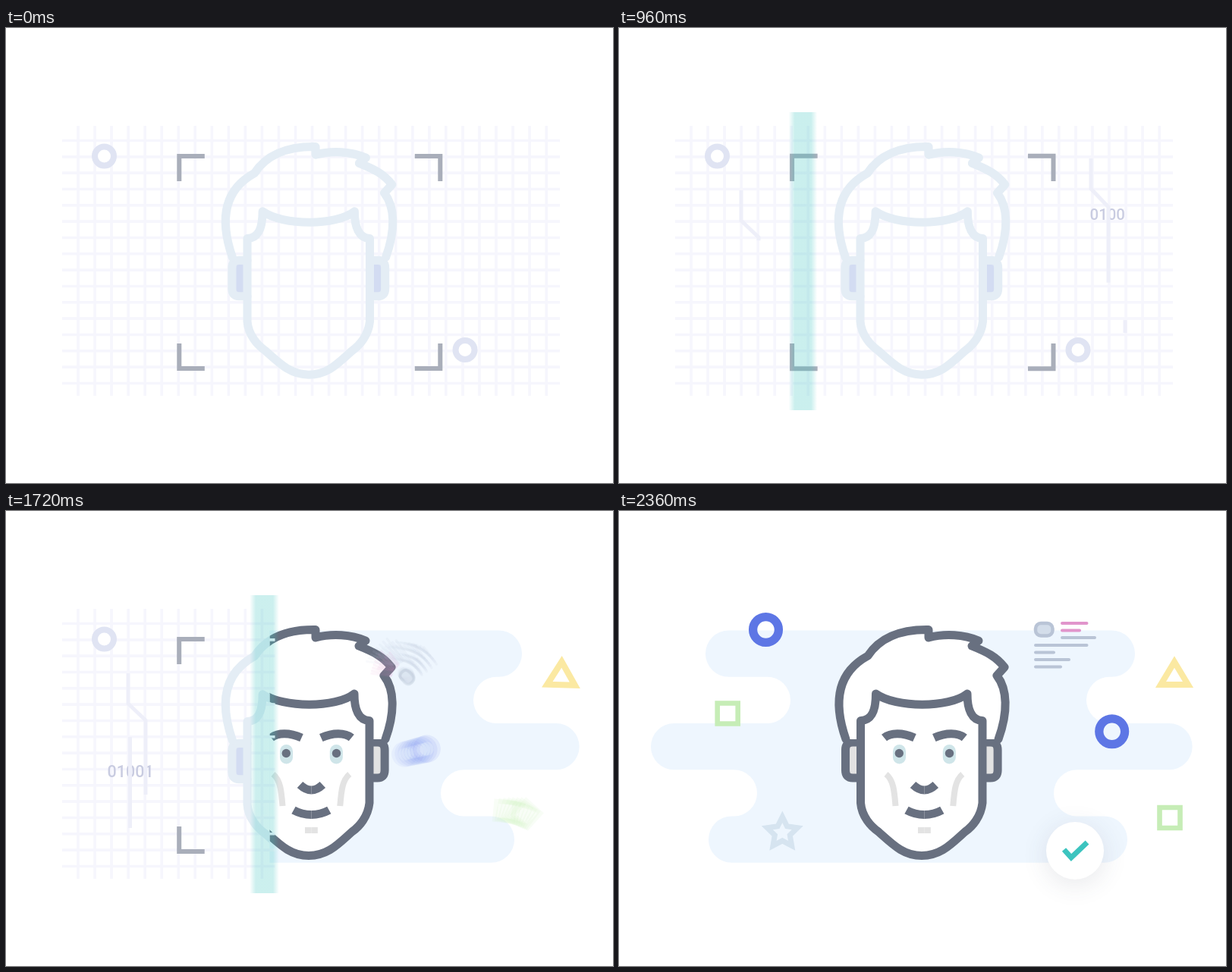
An HTML page with a canvas that plays this animation: 800 px wide and 600 px high, repeating every 4600 ms.

```html
<!DOCTYPE html>
<html lang="en">
<head>
<meta charset="utf-8">
<title>Face scan</title>
<style>
  html, body { margin: 0; width: 100%; height: 100%; overflow: hidden; background: #fff; }
  canvas { display: block; width: 100%; height: 100%; }
</style>
</head>
<body>
<canvas id="stage" width="800" height="600"></canvas>
<script>
const ctx = document.getElementById('stage').getContext('2d');
const LOOP = 4600, STEP = 40, SHUTTER = 20, TAU = Math.PI * 2;
const TEAL = '#3cc4bf', DARK = '#687080', PALE = '#e4edf5', WIRE = '#eeeff9';

const clamp = v => Math.max(0, Math.min(1, v));
const ramp = (t, start, end) => clamp((t - start) / (end - start));
const smooth = u => u * u * (3 - 2 * u);
const ease = (t, start, end) => smooth(ramp(t, start, end));
const mix = (a, b, p) => a + (b - a) * p;

function stroke(path, color, width) {
  ctx.strokeStyle = color;
  ctx.lineWidth = width;
  path ? ctx.stroke(path) : ctx.stroke();
}
function fill(path, color) {
  ctx.fillStyle = color;
  ctx.fill(path);
}
function scoped(draw) {
  ctx.save();
  draw();
  ctx.restore();
}
function clipX(from, to, draw) {
  if (to <= from) return;
  scoped(() => {
    ctx.beginPath();
    ctx.rect(from, 0, to - from, 600);
    ctx.clip();
    draw();
  });
}
function mirrored(axis, draw) {
  draw();
  scoped(() => {
    ctx.translate(axis * 2, 0);
    ctx.scale(-1, 1);
    draw();
  });
}

// ---- head ----
const hair = new Path2D(`M299 301C284 258 284 215 328 191C345 165 375 156 408 156.500V167
  C430 161 455 163 474 171L465 178C485 186 497 192 508 206L498 217C512 235 513 265 500 301`);
const face = new Path2D(`M318.500 276.500C334 276 338.500 262 338.500 241C365 260 435 260 459 241
  C459 262 465 276 479 276.500V385C477 403 466 416 456 423C437 440 424 454.500 399 454.500
  C375 454.500 361 440 342 423C332 416 320 403 318.500 385Z`);
const ear = new Path2D('M318.500 305H308Q298.500 305 298.500 315V342Q298.500 352 308 352H318.500');
const brow = new Path2D('M349.500 299C358 292 374 292 389.500 299');
const cheek = new Path2D('M352 347C362 355 363 371 364.500 389');
const nose = new Path2D('M387.500 361Q395 368 402.400 368');
const mouth = new Path2D('M379 394.500Q390 400.500 402.400 400.500');
const chin = new Path2D('M394 417H402.400V425H394Z');
const socket = new Path2D();
socket.roundRect(361, 308, 17, 25.5, 8.5);
const pupil = new Path2D();
pupil.arc(369.3, 319.5, 5.7, 0, TAU);

function head(line, earFill, solid) {
  scoped(() => {
    ctx.lineJoin = ctx.lineCap = 'round';
    mirrored(398.8, () => {
      fill(ear, earFill);
      stroke(ear, line, 11);
    });
    if (solid) {
      fill(hair, '#fff');
      fill(face, '#fff');
    }
    stroke(hair, line, 11);
    stroke(face, line, 11);
  });
}
function features(line, soft, eye) {
  mirrored(402.4, () => {
    if (eye) fill(socket, eye);
    fill(pupil, line);
    stroke(cheek, soft, 8);
    fill(chin, soft);
    for (const part of [brow, nose, mouth]) stroke(part, line, 11);
  });
}

// ---- scanner view ----
const grid = new Path2D();
for (let i = 0; i < 29; i++) grid.rect(93.2 + i * 22.04, 129, 3.6, 356);
for (let i = 0; i < 16; i++) grid.rect(74, 146.7 + i * 21.33, 656, 3.6);

function paleRing(x, y) {
  const ring = new Path2D();
  ring.arc(x, y, 12.5, 0, TAU);
  fill(ring, '#fff');
  stroke(ring, '#e0e4f3', 8);
}
function brackets(t) {
  const pulse = t < 260 ? 0 : (1 - Math.cos((t - 280) / 740 * TAU)) / 2;
  scoped(() => {
    ctx.translate(400.3, 309);
    ctx.scale(1 + pulse * .019, 1 + pulse * .017);
    ctx.beginPath();
    for (const sx of [-1, 1]) for (const sy of [-1, 1]) {
      ctx.moveTo(sx * 138.5, sy * 140);
      ctx.lineTo(sx * 172, sy * 140);
      ctx.lineTo(sx * 172, sy * 107);
    }
    stroke(null, '#a9aeba', 6);
  });
}
const wires = [
  { path: new Path2D('M622 172V212L645 236V336'), length: 173, start: 280, end: 900 },
  { path: new Path2D('M161 214V254L184 276V374'), length: 170, start: 656, end: 1336 },
  { path: new Path2D('M667 402V275'), length: 127, start: 900, end: 1353 },
  { path: new Path2D('M163.500 298V418'), length: 120, start: 1200, end: 1595 }
];
function drawWires(t) {
  for (const { path, length, start, end } of wires) {
    const shown = length * ramp(t, start, end);
    if (!shown) continue;
    ctx.setLineDash([shown, 400]);
    stroke(path, WIRE, 5);
  }
  ctx.setLineDash([]);
}
function code(t, x, y, start) {
  const u = ramp(t, start, start + 750), size = .72 + .28 * u;
  scoped(() => {
    ctx.translate(x, y);
    ctx.scale(size, size);
    ctx.font = '500 21.5px Roboto, sans-serif';
    ctx.fillStyle = '#c9cce1';
    ctx.fillText('01001'.slice(0, Math.floor(u * 5 + .001)), -30.5, 8);
  });
}
function scannerView(t, bar, edge) {
  clipX(0, edge && edge + 7, () => fill(grid, '#f6f6fd'));
  clipX(0, edge, () => {
    scoped(() => {
      ctx.translate(399.5, 152);
      ctx.scale(1.006, 1.009);
      ctx.translate(-399.5, -152);
      head(PALE, '#d3dcf2', false);
    });
    if (t > 760) clipX(0, t < 1360 ? bar : 800, () => features('#f0f1fa', '#f0f1fa'));
    paleRing(129.5, 169);
    paleRing(605, 424.5);
    brackets(t);
  });
  clipX(0, edge && edge - 19, () => {
    code(t, 649.5, 245, 350);
    code(t, 164, 343, 860);
  });
  clipX(0, edge, () => drawWires(t));
}

// ---- result view ----
function makeBlob() {
  const right = [649.4, 646.6, 725, 603.6, 639.4];
  const left = [144.6, 195.4, 72.6, 151.4, 148.6];
  const r = 30.63, blob = new Path2D(), q = Math.PI / 2;
  const midY = i => 157.5 + r * (2 * i + 1);
  for (let i = 0; i < 5; i++) blob.arc(right[i], midY(i), r, -q, q, i % 2 === 1);
  for (let i = 4; i >= 0; i--) blob.arc(left[i], midY(i), r, q, -q, i % 2 === 1);
  blob.closePath();
  return blob;
}
const blob = makeBlob();

const ringPath = new Path2D();
ringPath.arc(0, 0, 16.9, 0, TAU);
const squarePath = new Path2D('M-13.500 -13.500H13.500V13.500H-13.500Z');
const trianglePath = new Path2D('M0 -14L18 16H-18Z');
const starPath = new Path2D();
for (let i = 0; i < 10; i++) {
  const r = i % 2 ? 10.5 : 21, a = i * Math.PI / 5;
  starPath.lineTo(r * Math.sin(a), -r * Math.cos(a));
}
starPath.closePath();
const pill = new Path2D();
pill.roundRect(-39, -29, 22.5, 16.5, 7);
const cardPink = new Path2D('M-4 -29H28.500M-4 -19.500H19');
const cardGrey = new Path2D('M-4 -10H39M-39 0H28.500M-39 9.500H-15M-39 19H5M-39 28.500H-6');

const ring = () => stroke(ringPath, '#5d76e5', 11.3);
const square = () => stroke(squarePath, '#c6edb6', 6.6);
const triangle = () => stroke(trianglePath, '#fbe9a2', 8);
const star = () => stroke(starPath, '#d6e4f0', 7);
function card() {
  ctx.lineCap = 'round';
  fill(pill, '#d3ddea');
  stroke(pill, '#b9c4d6', 4.5);
  stroke(cardPink, '#e195cc', 4);
  stroke(cardGrey, '#b9c4d6', 4);
}
const FLIGHT = 222;
const items = [
  { draw: triangle, x: 732, y: 213, fromY: 340, start: 1470 },
  { draw: square, x: 726, y: 404.5, fromY: 364, start: 1555 },
  { draw: card, x: 588, y: 177, fromY: 218, start: 1590 },
  { draw: ring, x: 649.7, y: 290.7, fromY: 351, start: 1600 },
  { draw: star, x: 215.3, y: 424.3, fromY: 380, start: 1640 },
  { draw: square, x: 143.2, y: 267, fromY: 330, start: 1685 },
  { draw: ring, x: 193.5, y: 156.5, fromY: 387, start: 1745 }
];
function drawItem(item, t, weight) {
  const p = ease(t, item.start, item.start + FLIGHT);
  const settle = Math.sin(Math.PI * ramp(t, item.start + FLIGHT, item.start + 400));
  const side = item.x > 400 ? 1 : -1;
  const size = .5 + .5 * p + .03 * settle;
  scoped(() => {
    ctx.globalAlpha = weight * clamp((p - .3) / .4);
    ctx.translate(mix(400, item.x, p), mix(item.fromY, item.y, p));
    ctx.rotate(side * (3.5 * settle - 400 * (1 - p)) * Math.PI / 180);
    ctx.scale(size, size);
    item.draw();
  });
}
function drawItems(t) {
  const samples = 8;
  for (const item of items) {
    if (t >= item.start + FLIGHT) drawItem(item, t, 1);
    else if (t > item.start) {
      for (let k = 0; k < samples; k++) {
        drawItem(item, t + SHUTTER * ((k + .5) / samples - .5), 1 / samples);
      }
    }
  }
}
function resultView(edge) {
  clipX(edge, 800, () => {
    fill(blob, '#eef6fe');
    head(DARK, '#e2e2e2', true);
    features(DARK, '#e3e3e3', '#cfe5e9');
  });
}

const disc = new Path2D();
disc.arc(0, 0, 38, 0, TAU);
const tick = new Path2D('M-14.500 -1.500L-5 9L16 -11');
function badge(t) {
  const u = ramp(t, 2040, 2320);
  if (!u) return;
  const size = 1 + 2.2 * (u - 1) ** 3 + 1.2 * (u - 1) ** 2;
  scoped(() => {
    ctx.translate(601, 448);
    ctx.scale(size, size);
    ctx.shadowColor = 'rgba(60, 70, 90, .13)';
    ctx.shadowBlur = 34;
    ctx.shadowOffsetY = 6;
    fill(disc, '#fff');
    ctx.shadowColor = 'transparent';
    ctx.setLineDash([44 * ease(t, 2140, 2360), 100]);
    stroke(tick, TEAL, 7);
  });
}

// ---- scan bar ----
const BAR_LEFT = 70, BAR_RIGHT = 735;
const barX = t => t < 1360
  ? mix(BAR_LEFT, BAR_RIGHT, ease(t, 760, 1360))
  : mix(BAR_RIGHT, BAR_LEFT, ease(t, 1360, 2000));

function drawBar(t) {
  const grow = ease(t, 440, 680) * 1.015 - ease(t, 680, 800) * .015;
  const half = 196.5 * grow * (1 - ease(t, 2000, 2240));
  if (half <= 0) return;
  const x = barX(t);
  const blur = Math.abs(barX(t + SHUTTER / 2) - barX(t - SHUTTER / 2));
  // An 8px bar smeared over the shutter time has a trapezoid profile.
  const reach = (8 + blur) / 2, soft = Math.min(8, blur), peak = Math.min(1, 8 / blur);
  const tint = a => `rgba(60, 196, 191, ${a})`;
  const gradient = ctx.createLinearGradient(x - reach, 0, x + reach, 0);
  const inset = soft / (2 * reach);
  gradient.addColorStop(0, tint(blur < .1 ? 1 : 0));
  gradient.addColorStop(inset, tint(peak));
  gradient.addColorStop(1 - inset, tint(peak));
  gradient.addColorStop(1, tint(blur < .1 ? 1 : 0));
  ctx.fillStyle = gradient;
  ctx.fillRect(x - reach, 307.5 - half, reach * 2, half * 2);
}

function render(t) {
  const bar = barX(t);
  const edge = t < 1360 ? 800 : t < 2000 ? bar + 7 : 0;
  ctx.fillStyle = '#fff';
  ctx.fillRect(0, 0, 800, 600);
  resultView(edge);
  scannerView(t, bar, edge);
  drawBar(t);
  drawItems(t);
  badge(t);
}

const begin = performance.now();
function frame() {
  const t = (performance.now() - begin) % LOOP;
  render(Math.floor(t / STEP) * STEP);
  requestAnimationFrame(frame);
}
frame();
</script>
</body>
</html>
```
